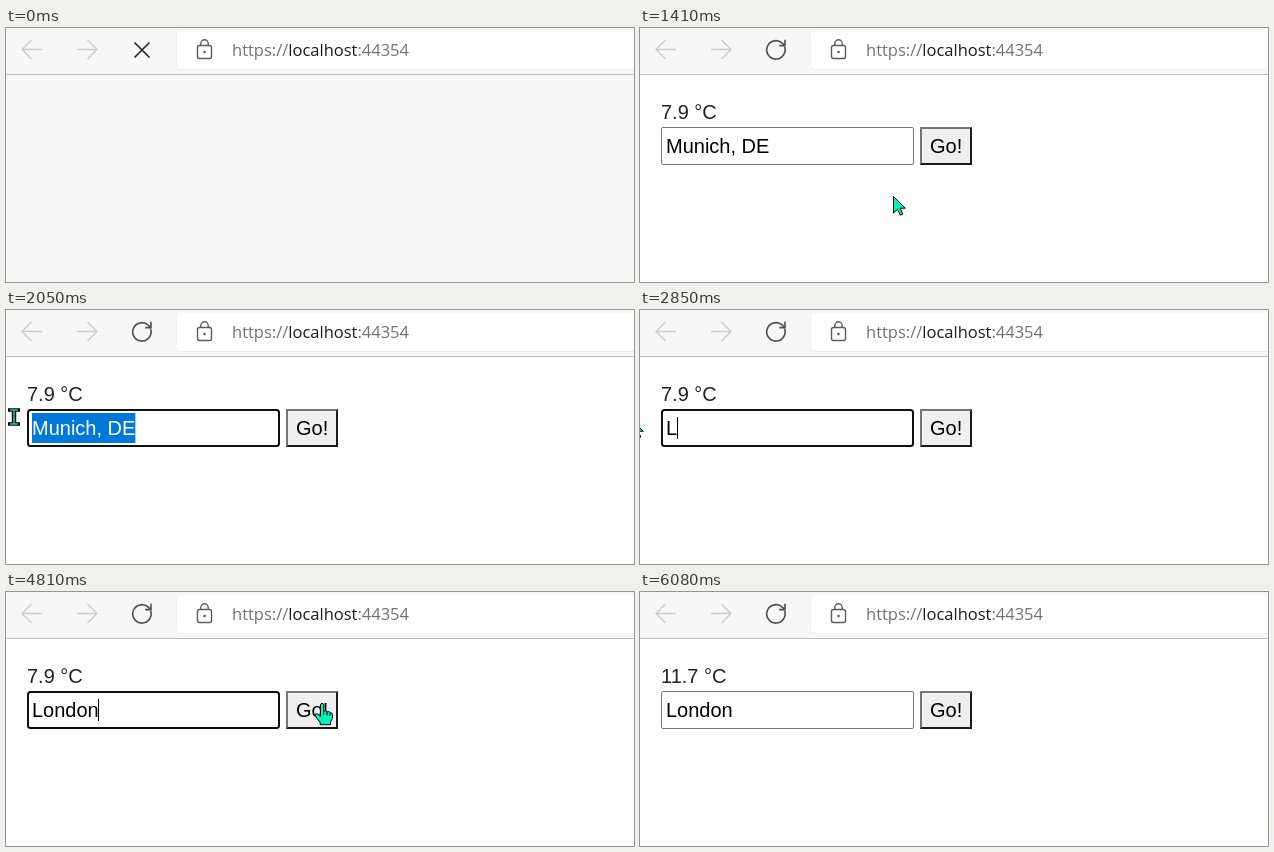
Recreate the animation shown at these times as an HTML page. Size 628 by 254 pixels, loop 6680 ms.

```html
<!DOCTYPE html>
<html lang="en">
<head>
<meta charset="utf-8">
<title>Weather lookup</title>
<style>
  html, body { margin: 0; width: 100%; height: 100%; overflow: hidden; background: #fff; }
  svg { display: block; width: 628px; height: 254px; }
  text { white-space: pre; }
  .page { font: 20px "Liberation Sans", Arial, sans-serif; }
  .url { font: 16.5px "Open Sans", "Noto Sans", sans-serif; fill: #6f7274; }
  .line { fill: none; stroke-width: 1.4; }
  .cursor { fill: #00f4bb; stroke: #000; stroke-width: 1; stroke-linejoin: round; }
</style>
</head>
<body>
<svg viewBox="0 0 628 254">
  <rect id="page" y="47" width="628" height="207"/>

  <g id="toolbar">
    <rect width="628" height="46" fill="#f7f7f7"/>
    <rect y="46" width="628" height="1" fill="#bebebe"/>
    <rect x="170.5" y="3" width="470" height="39" rx="4" fill="#ececec"/>
    <rect x="171" y="3" width="470" height="38" rx="4" fill="#fff"/>
    <g class="line" stroke="#cdcdcd">
      <path d="M36 21.5H16.5M25.5 12L16 21.5L25.5 31"/>
      <path d="M71 21.5H90.5M81.5 12L91 21.5L81.5 31"/>
    </g>
    <path id="stop" class="line" stroke="#2b2b2b" style="stroke-width:1.7" d="M128.5 14.5L143.5 29.5M143.5 14.5L128.5 29.5"/>
    <g id="reload" class="line" stroke="#4d4d4d" style="stroke-width:1.6">
      <path d="M144.6 18.8A9.2 9.2 0 1 1 141 14.2L144.5 17.2"/>
      <path d="M145 11.8V17.6H139.2"/>
    </g>
    <g class="line" stroke="#5c5c5c">
      <rect x="191.5" y="17.5" width="14" height="13" rx="2"/>
      <path d="M194.8 17.5V15.5a3.7 3.7 0 0 1 7.4 0V17.5"/>
      <circle cx="198.5" cy="24" r="1.3" fill="#5c5c5c" stroke="none"/>
    </g>
    <text class="url" x="226" y="28">https://<tspan fill="#1c1c1c">localhost</tspan>:44354</text>
  </g>

  <text id="status" class="page" x="21" y="91" fill="#212529"></text>

  <g id="form" class="page">
    <rect id="field" fill="#fff"/>
    <rect id="highlight" y="103" height="30" fill="#0078d7"/>
    <text x="26" y="125"><tspan id="plain"></tspan><tspan id="selected" fill="#fff"></tspan></text>
    <rect id="caret" y="107" width="1" height="22"/>
    <rect id="lowEdge" x="280" y="99" width="52" height="38"/>
    <path id="highEdge" d="M280 137V99H332L330 101H282V135Z"/>
    <rect x="282" y="101" width="48" height="34" fill="#efefef"/>
    <text x="290" y="125">Go!</text>
  </g>

  <path id="arrow" class="cursor" d="M.5 .5V17L4.5 13.2L7.2 19.2L9.8 18.1L7.2 12.2H12.3Z"/>
  <g id="beam" fill="none">
    <path d="M-6 -7H6M-6 7H6" stroke="#000" stroke-width="3.4"/>
    <path d="M0 -8V8" stroke="#000" stroke-width="4.4"/>
    <path d="M0 -7V7M-4 -7H4M-4 7H4" stroke="#1fc79f" stroke-width="1.6"/>
  </g>
  <g id="hand" class="cursor">
    <path d="M-1.5 2a1.6 1.6 0 0 1 3.2 0V8L4 7.8L5.2 8.8L7.4 8.7L8.5 9.8L10 10.2L10.5 11.5V15.5L8.5 19V21.7H-1.8V19.6L-5 15.4L-7 12.2Q-6.8 10 -4.4 11L-1.5 13.4Z"/>
    <path d="M1.7 8V12M5 9V12.5M8 10V13" fill="none"/>
  </g>
</svg>
<script>
const LOOP = 6680;
const TEXT_X = 26;
const $ = id => document.getElementById(id);
const show = (id, on) => { $(id).style.display = on ? "" : "none"; };
const attrs = (id, values) => {
  for (const name in values) $(id).setAttribute(name, values[name]);
};

// Each step overrides part of the state from its time on.
const steps = [
  [0, { loaded: false, status: "", form: false, value: "", field: "idle",
        selectFrom: null, caret: false, pressed: false, cursor: null }],
  [70, { loaded: true }],
  [470, { status: "Loading..." }],
  [870, { status: "7.9 °C", form: true, value: "Munich, DE" }],
  [1620, { field: "hover" }],
  [1900, { field: "focus", caret: true }],
  [1970, { selectFrom: 4, caret: false }],
  [2040, { selectFrom: 0 }],
  [2850, { value: "L", selectFrom: null, caret: true }],
  [3050, { value: "Lo" }],
  [3250, { value: "Lon" }],
  [3320, { value: "Lond" }],
  [3390, { value: "Londo" }],
  [3520, { value: "London" }],
  [4050, { caret: false }],
  [4600, { caret: true }],
  [5010, { field: "idle", caret: false, pressed: true }],
  [5080, { status: "Loading...", form: false, pressed: false }],
  [5210, { status: "11.7 °C", form: true }]
];

// Pointer moves: start time, shape, then one point per 70 ms.
const moves = [
  [1200, "arrow", [[309, 184], [297, 182], [277, 177], [253, 168], [230, 157], [211, 147]]],
  [1620, "beam", [[197, 136], [188, 129], [183, 125], [180, 124], [150, 117], [70, 106], [8, 107]]],
  [2170, "arrow", [[-9, 109]]],
  [4180, "arrow", [[8, 126], [62, 147], [140, 158], [225, 162], [300, 163], [346, 161], [352, 146]]],
  [4670, "hand", [[328, 112], [320, 112], [316, 111]]],
  [6010, "arrow", [[378, 157]]],
  [6080, null, [[0, 0]]]
];
for (const [start, shape, points] of moves)
  points.forEach(([x, y], i) =>
    steps.push([start + 70 * i, { cursor: shape && { shape, x, y } }]));
steps.sort((a, b) => a[0] - b[0]);

const pen = document.createElement("canvas").getContext("2d");
pen.font = '20px "Liberation Sans", Arial, sans-serif';
const endOf = text => TEXT_X + pen.measureText(text).width;

const fieldStyles = {
  idle: { inset: .5, stroke: "#767676", "stroke-width": 1, rx: 1.5 },
  hover: { inset: .5, stroke: "#4a4a4a", "stroke-width": 1, rx: 1.5 },
  focus: { inset: 1, stroke: "#101010", "stroke-width": 2, rx: 2.5 }
};

function draw(time) {
  const s = Object.assign({}, ...steps.filter(([at]) => at <= time).map(step => step[1]));

  attrs("page", { fill: s.loaded ? "#fff" : "#f7f7f7" });
  show("stop", !s.loaded);
  show("reload", s.loaded);
  $("status").textContent = s.status;
  show("form", s.form);

  const { inset, ...border } = fieldStyles[s.field];
  attrs("field", { x: 21 + inset, y: 99 + inset, width: 253 - 2 * inset, height: 38 - 2 * inset, ...border });

  const split = s.selectFrom ?? s.value.length;
  const left = endOf(s.value.slice(0, split));
  const right = endOf(s.value);
  $("plain").textContent = s.value.slice(0, split);
  $("selected").textContent = s.value.slice(split);
  attrs("highlight", { x: left, width: right - left });
  attrs("caret", { x: Math.floor(right) });
  show("caret", s.caret);

  attrs("lowEdge", { fill: s.pressed ? "#767676" : "#1a1a1a" });
  attrs("highEdge", { fill: s.pressed ? "#1a1a1a" : "#767676" });

  for (const shape of ["arrow", "beam", "hand"]) {
    const active = s.cursor?.shape === shape;
    show(shape, active);
    if (active) attrs(shape, { transform: `translate(${s.cursor.x} ${s.cursor.y})` });
  }
}

const origin = performance.now();
function tick() {
  draw((performance.now() - origin) % LOOP);
  requestAnimationFrame(tick);
}
tick();
</script>
</body>
</html>
```
